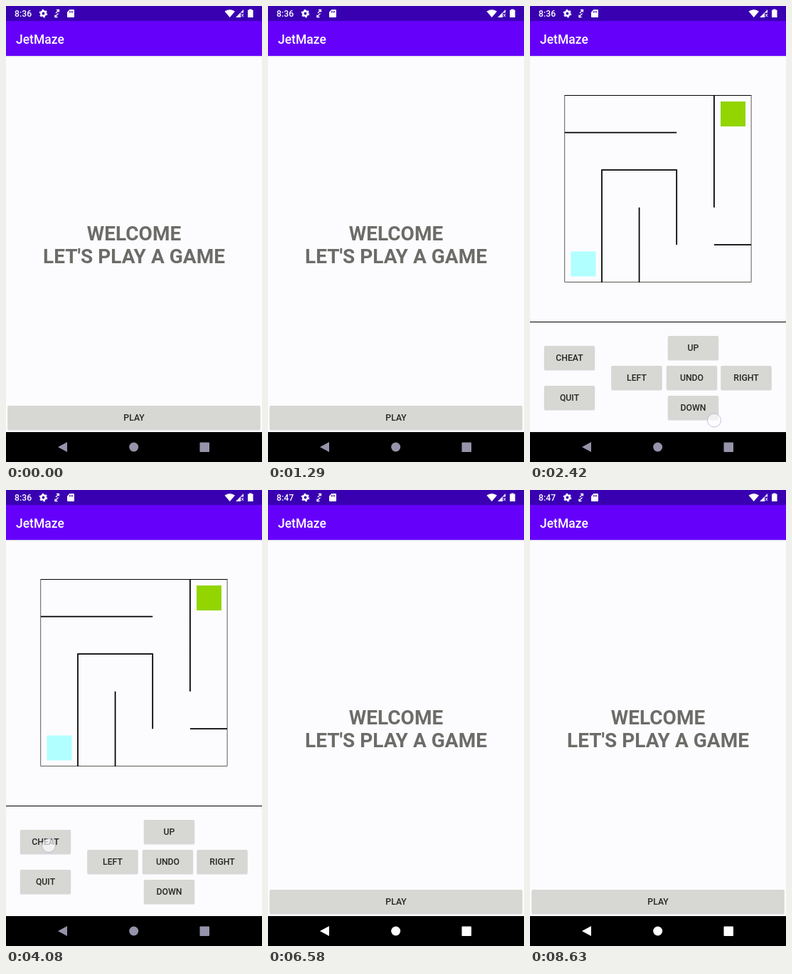
Recreate the animation shown at these times as an HTML page. Size 360 by 640 pixels, loop 8.68 s.

```html
<!DOCTYPE html>
<html lang="en">
<head>
<meta charset="utf-8">
<title>JetMaze</title>
<style>
  html, body { margin: 0; width: 100%; height: 100%; overflow: hidden; background: #fcfcff; }
  svg { display: block; width: 360px; height: 640px; font-family: Roboto, sans-serif; }
  .label { font-size: 12.26px; font-weight: 500; text-anchor: middle; fill: #262626; }
  .headline { font-size: 28px; font-weight: 700; text-anchor: middle; fill: #6c6c68; }
  .button { fill: #d7d7d3; }
  .shadow { fill: #dedee6; }
  .wall { fill: none; stroke: #000; stroke-width: 1.75; }
  .touch { fill: #fff; fill-opacity: .65; stroke: #b2b2d4; stroke-opacity: .8; }

  .timed { opacity: 0; animation: 8680ms step-end infinite; }
  .welcome { animation-name: welcome; }
  .maze { animation-name: maze; }
  .won { animation-name: won; }
  .early { animation-name: early; }
  .late { animation-name: late; }
  .tap-play { animation-name: tap-play; }
  .tap-cheat { animation-name: tap-cheat; }

  @keyframes welcome { 0% { opacity: 1 } 27.42% { opacity: 0 } 72.58%, 100% { opacity: 1 } }
  @keyframes maze { 0% { opacity: 0 } 27.42% { opacity: 1 } 53.8%, 100% { opacity: 0 } }
  @keyframes won { 0% { opacity: 0 } 53.8% { opacity: 1 } 72.58%, 100% { opacity: 0 } }
  @keyframes early { 0% { opacity: 1 } 72.58%, 100% { opacity: 0 } }
  @keyframes late { 0% { opacity: 0 } 72.58%, 100% { opacity: 1 } }
  @keyframes tap-play { 0% { opacity: 0 } 26.84% { opacity: 1 } 28.34%, 100% { opacity: 0 } }
  @keyframes tap-cheat { 0% { opacity: 0 } 45.16% { opacity: 1 } 47.58%, 100% { opacity: 0 } }
</style>
</head>
<body>
<svg viewBox="0 0 360 640">
  <rect width="360" height="640" fill="#fcfcff"/>

  <!-- Status bar -->
  <rect width="360" height="21.5" fill="#3900b2"/>
  <g fill="#fff">
    <g font-size="12.26" font-weight="500">
      <text class="timed early" x="12" y="15">8:36</text>
      <text class="timed late" x="12" y="15">8:47</text>
    </g>
    <g fill="none" stroke="#fff">
      <circle cx="52.5" cy="10.5" r="3.2" stroke-width="2.6"/>
      <circle cx="52.5" cy="10.5" r="5" stroke-width="1.6" stroke-dasharray="2.6 2.636"/>
      <path d="M71 5.5h3.5v3M74.5 5.5L70 10M73.5 10.5L69 15M69 12.5V15.5h3.5" stroke-width="1.3"/>
    </g>
    <path d="M89.5 5H95a1 1 0 0 1 1 1V15a1 1 0 0 1-1 1H87a1 1 0 0 1-1-1V8.5Z"/>
    <path d="M89.5 7v2.5M91.5 7v2.5M93.5 7v2.5" stroke="#3900b2"/>
    <path d="M307.5 7.5Q314.7 2.5 322 7.5L314.7 16Z"/>
    <path d="M334 5V9.5H330V16H323Z"/>
    <path d="M331 11l3 4M334 11l-3 4" stroke="#fff"/>
    <path d="M342 4.5h3.5V5.5H347.5V16H340V5.5H342Z"/>
  </g>

  <!-- App bar -->
  <rect y="21" width="360" height="49" fill="#6500fa"/>
  <rect y="70" width="360" height="1" fill="#dedee6"/>
  <rect y="71" width="360" height="1" fill="#f2f2f8"/>
  <text x="14" y="52.5" font-size="17.5" font-weight="500" fill="#fff">JetMaze</text>

  <g class="timed welcome">
    <text class="headline" x="180" y="328.5">WELCOME</text>
    <text class="headline" x="180" y="361.3">LET'S PLAY A GAME</text>
    <g data-button="PLAY" data-box="2.5 561 355 33.5"></g>
  </g>

  <g class="timed won">
    <text class="headline" x="180" y="328.5">CONGRATUALTIONS!</text>
    <text class="headline" x="180" y="361.3">YOU GOT OUT!</text>
    <g data-button="RETURN" data-box="2.5 561 355 33.5"></g>
  </g>

  <g class="timed maze">
    <path d="M48.5 125.5H311.5" stroke="#000"/>
    <path d="M48.7 125V387.5H311.1V125" fill="none" stroke="#5c5c58"/>
    <path class="wall" d="M49 177.5H206.2M258.9 125V282.7M101 388V230.2H206.2V335.2M153.6 282.7V388M258.9 335.2H311"/>
    <rect x="57.5" y="344.5" width="35" height="35" fill="#b1ffff"/>
    <rect x="268" y="134" width="35" height="35" fill="#92d500"/>
    <path d="M0 443.5H360" stroke="#000"/>
    <g data-button="CHEAT" data-box="20 477 71 33.5"></g>
    <g data-button="QUIT" data-box="20 533 71 33.5"></g>
    <g data-button="UP" data-box="194 463 71 33.5"></g>
    <g data-button="LEFT" data-box="114.5 505 71 33.5"></g>
    <g data-button="UNDO" data-box="192 505 71 33.5"></g>
    <g data-button="RIGHT" data-box="268.5 505 71 33.5"></g>
    <g data-button="DOWN" data-box="194 547 71 33.5"></g>
  </g>

  <!-- Navigation bar -->
  <rect y="598" width="360" height="42"/>
  <defs>
    <g id="nav">
      <path d="M73 619L86 612V626Z"/>
      <circle cx="179.7" cy="619" r="6.5"/>
      <rect x="272.5" y="612.5" width="13.5" height="13.5" rx="1"/>
    </g>
  </defs>
  <use class="timed early" href="#nav" fill="#9594ab"/>
  <use class="timed late" href="#nav" fill="#fff"/>

  <circle class="touch timed tap-play" cx="259" cy="581.5" r="9.5"/>
  <circle class="touch timed tap-cheat" cx="60" cy="499" r="9.5"/>
</svg>
<script>
  for (const button of document.querySelectorAll('[data-button]')) {
    const [x, y, w, h] = button.dataset.box.split(' ').map(Number);
    button.innerHTML = `
      <rect class="shadow" x="${x - .3}" y="${y + .5}" width="${w + .6}" height="${h + .8}" rx="2"/>
      <rect class="button" x="${x}" y="${y}" width="${w}" height="${h}" rx="1.5"/>
      <text class="label" x="${x + w / 2}" y="${y + 20.8}">${button.dataset.button}</text>`;
  }
</script>
</body>
</html>
```
